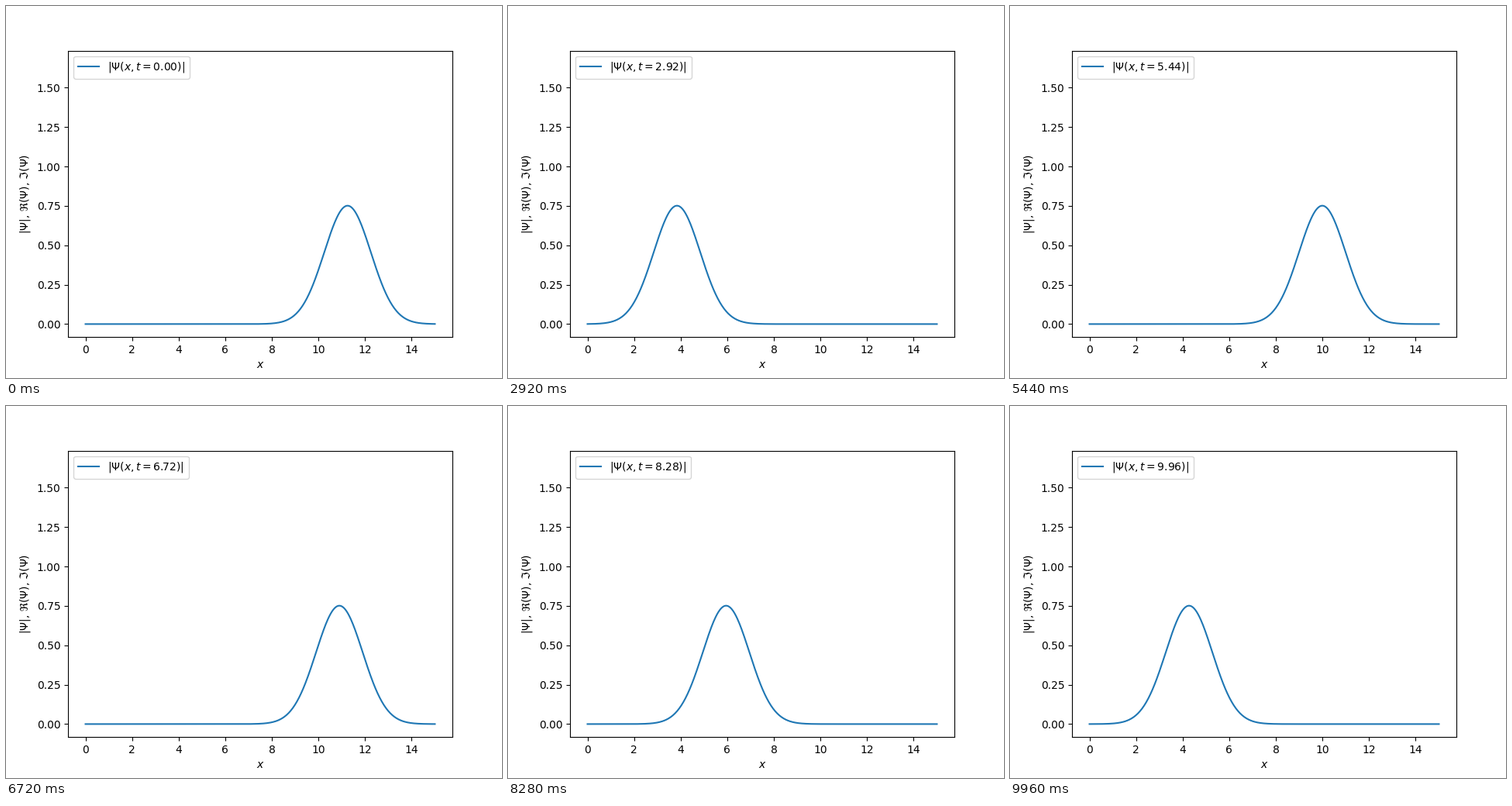
Recreate the animation shown at these times as a matplotlib script. Size 640 px wide and 480 px high, loop 10 s.

```python
import numpy as np
import matplotlib.pyplot as plt
from matplotlib.animation import FuncAnimation

FRAMES = 250
INTERVAL = 40  # ms
LENGTH = 15.0
CENTER = LENGTH / 2
SWING = LENGTH / 4
PEAK = np.pi ** -0.25


def packet(x, t):
    """Modulus of a coherent state swinging in a harmonic well."""
    mean = CENTER + SWING * np.cos(t)
    return PEAK * np.exp(-(x - mean) ** 2 / 2)


def label(t):
    return rf"$|\Psi(x,t={t:.2f})|$"


fig, ax = plt.subplots(figsize=(6.4, 4.8), dpi=100)
x = np.linspace(0, LENGTH, 500)
line, = ax.plot(x, packet(x, 0), label=label(0))

height = 2.2 * PEAK
ax.set_xlim(-0.05 * LENGTH, 1.05 * LENGTH)
ax.set_ylim(-0.05 * height, 1.05 * height)
ax.set_xlabel(r"$x$")
ax.set_ylabel(r"$|\Psi|$, $\Re(\Psi)$, $\Im(\Psi)$")
legend_text = ax.legend(loc="upper left").get_texts()[0]


def update(frame):
    t = frame * INTERVAL / 1000
    line.set_ydata(packet(x, t))
    legend_text.set_text(label(t))
    return line, legend_text


anim = FuncAnimation(fig, update, frames=FRAMES, interval=INTERVAL,
                     repeat=True, repeat_delay=0, blit=False)
plt.show()
```
